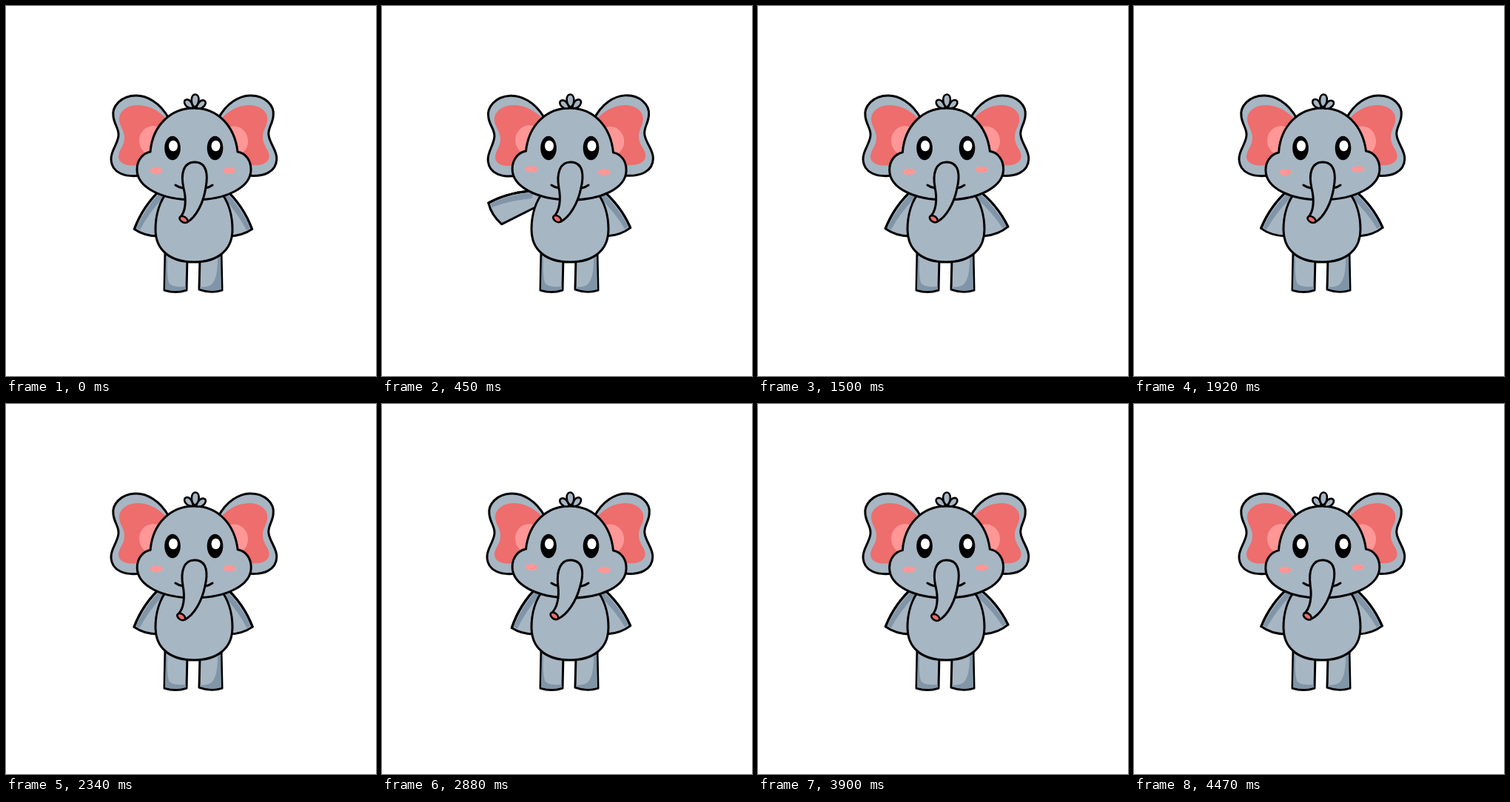
An HTML page that plays this animation: 500x500 px, repeating every 4500 ms.

```html
<!DOCTYPE html>
<html lang="en">
<head>
<meta charset="utf-8">
<title>Waving elephant</title>
<style>
  html, body { margin: 0; width: 100%; height: 100%; overflow: hidden; background: #fff; }
  svg { display: block; width: 100%; height: 100%; }
  .line { fill: #a7b6c3; stroke: #000; stroke-width: 3; stroke-linejoin: round; stroke-linecap: round; }
  .open { fill: none; }
  .shade { fill: #8195a8; }
  .red { fill: #ee6d6d; }
  .pink { fill: #ff9797; }
</style>
</head>
<body>
<svg viewBox="0 0 500 500">
  <defs>
    <g id="arm">
      <path class="line" d="M211 246Q185 270 173.500 301.500Q187 311 206 311L232 245Z"/>
      <path class="shade" d="M210 250Q188 273 176 300L181 303Q192 281 213 258Z"/>
      <path class="line open" d="M211 246Q185 270 173.500 301.500"/>
    </g>
    <g id="ear">
      <path class="line" d="M220 152C208 130 190 121 176 121C155 121 143 136 145 149C146 160 153 166 152 175C151 187 141 196 142 208C143 225 160 232 182 229L215 200Z"/>
      <path class="red" d="M219 155C206 140 192 134 178 134C162 134 152 144 153 154C154 164 160 168 160 178C160 190 152 194 152 204C153 214 165 217 179 215L215 195Z"/>
      <ellipse class="pink" cx="199" cy="182" rx="19" ry="20"/>
    </g>
    <g id="eye">
      <ellipse rx="10.800" ry="16.300"/>
      <ellipse cx="1" cy="-3" rx="6" ry="7.300" fill="#fff"/>
    </g>
    <path id="tuft" class="line" style="stroke-width:2.6" d="M253 138C243 140 238 130 242 127.500C247 125 252 131 253 138Z"/>
  </defs>

  <path class="line" d="M215 334L214 384Q229 389 244 384L245 340Z"/>
  <path class="shade" d="M216 338L218 342Q217 362 220 374Q224 381 243 379L243 383Q229 387 215 383Z"/>
  <path class="line" d="M262 340L261 383Q277 389 292 384L291 334Z"/>
  <path class="shade" d="M290 337L286 342Q286 368 278 376Q274 380 262 380L262 382Q277 387 291 383Z"/>

  <g id="leftArm"><use href="#arm"/></g>
  <g id="rightArm"><use href="#arm" transform="translate(506 0) scale(-1 1)"/></g>
  <path class="line" d="M219 250C207 264 202 284 202 302C202 330 222 346 254 346C286 346 306 330 306 302C306 284 301 264 289 250Z"/>

  <g id="leftEar"><use href="#ear"/></g>
  <g id="rightEar"><use href="#ear" transform="translate(507 0) scale(-1 1)"/></g>

  <path id="head" class="line" d="M195 197C198 162 222 138 254 138C286 138 309 162 313 197C325 199 331 210 331 221C331 245 298 262 254 262C210 262 177 245 177 221C177 208 185 199 195 197Z"/>
  <g id="hair">
    <use href="#tuft"/>
    <use href="#tuft" transform="translate(510 0) scale(-1 1)"/>
    <path class="line" style="stroke-width:2.6" d="M255 137C248 132 249 119.500 255 119.500C261 119.500 262 132 255 137Z"/>
  </g>

  <use href="#eye" x="225" y="192"/>
  <use href="#eye" transform="translate(282.500 192)"/>
  <g id="cheeks" class="pink">
    <ellipse cx="203" cy="222.500" rx="8.700" ry="4.200"/>
    <ellipse cx="301.500" cy="222.500" rx="8.700" ry="4.200"/>
  </g>
  <path class="line open" d="M229 242Q233 245 239 246M270 246Q275 245 279 242"/>

  <g id="trunk">
    <path class="line" d="M235 286C243 278 244 262 240 246C236 228 239 211 255 211C272 211 273 229 270 245C267 266 257 285 245 292Z"/>
    <ellipse class="line" style="fill:#ee6d6d;stroke-width:2.600" cx="240" cy="288.500" rx="6" ry="3.800" transform="rotate(32 240 288.500)"/>
  </g>
</svg>
<script>
const LOOP = 4500;
const cycle = (t, period) => Math.sin(2 * Math.PI * t / period);
const sway = t => cycle(t, 2430);
const wave = t => t < 1420 ? Math.sin(Math.PI * t / 1420) : 0;
const swing = (t, period) => Math.sin(Math.PI * t / period) ** 2;

// Each part turns about its pivot by an angle in degrees.
const parts = {
  leftArm: { pivot: [205, 245], angle: t => 52 * wave(t) - 2 * sway(t) },
  rightArm: { pivot: [301, 245], angle: t => -6 * Math.abs(sway(t / 2)) },
  leftEar: { pivot: [180, 178], angle: t => -2.8 * wave(t) },
  rightEar: { pivot: [327, 178], angle: t => -1.5 - 1.5 * wave(t) },
  head: { pivot: [254, 165], angle: t => sway(t) },
  hair: { pivot: [255, 138], angle: t => -5 * sway(t - 250) },
  cheeks: { pivot: [252, 195], angle: t => 2.5 * sway(t) },
  trunk: { pivot: [255, 225], angle: t => 6.5 * swing(t, 1900) }
};

function draw() {
  const t = performance.now() % LOOP;
  for (const [id, { pivot, angle }] of Object.entries(parts)) {
    document.getElementById(id).setAttribute("transform", `rotate(${angle(t)} ${pivot})`);
  }
  requestAnimationFrame(draw);
}
draw();
</script>
</body>
</html>
```
